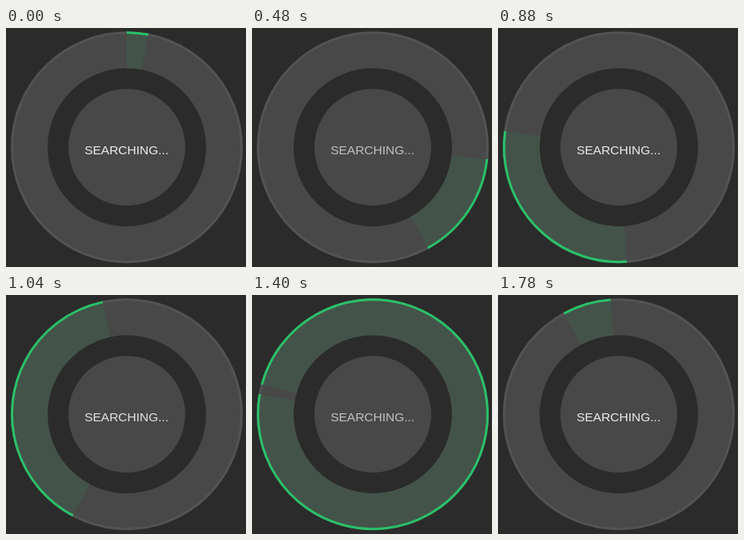
Write an HTML page that moves like this. It is 300 px wide and 299 px high and loops after 1.8 s.

```html
<!DOCTYPE html>
<html lang="en">
<head>
<meta charset="utf-8">
<title>Searching</title>
<style>
  html, body { margin: 0; width: 100%; height: 100%; overflow: hidden; background: #2b2b2b; }
  svg { display: block; width: 300px; height: 299px; }
  circle { fill: none; }
  text { font: 15.5px "Liberation Sans", Arial, sans-serif; fill: #fff; text-anchor: middle; }
</style>
</head>
<body>
<svg viewBox="0 0 300 299">
  <g transform="translate(151 149.2)">
    <circle r="121" stroke="#484848" stroke-width="44"/>
    <circle r="143.5" stroke="#535353" stroke-width="3"/>
    <circle r="73" style="fill:#484848"/>
    <g id="sweep">
      <circle r="120.5" pathLength="360" stroke="#435349" stroke-width="43"/>
      <circle r="143.5" pathLength="360" stroke="#29c168" stroke-width="3"/>
    </g>
  </g>
  <text id="label" x="150.7" y="158">SEARCHING...</text>
</svg>
<script>
const LOOP = 1800, STEP = 20;
const sweep = document.getElementById('sweep');
const label = document.getElementById('label');

// Time and dash travel in degrees: up to 360 the arc grows, after that its tail catches up.
const keys = [[0, 10.8], [320, 39.6], [640, 72.3], [880, 102],
              [1200, 200], [1400, 365], [1600, 571], [1800, 709]];

function slope(i) {
  const a = keys[Math.max(i - 1, 0)], b = keys[Math.min(i + 1, keys.length - 1)];
  return (b[1] - a[1]) / (b[0] - a[0]);
}

function travel(t) {
  let i = 0;
  while (t > keys[i + 1][0]) i++;
  const [t0, u0] = keys[i], [t1, u1] = keys[i + 1];
  const d = t1 - t0, s = (t - t0) / d, q = 1 - s;
  return u0 * q * q * (1 + 2 * s) + u1 * s * s * (3 - 2 * s)
       + d * s * q * (slope(i) * q - slope(i + 1) * s);
}

function draw(t) {
  const u = travel(t);
  const start = t / LOOP * 360 + Math.max(0, u - 360);
  const length = u < 360 ? u : 720 - u;
  sweep.setAttribute('transform', `rotate(${start - 90})`);
  sweep.setAttribute('stroke-dasharray', `${length} 360`);
  label.setAttribute('opacity', 0.78 + 0.12 * Math.cos(t / LOOP * 4 * Math.PI));
}

const begin = performance.now();
function tick() {
  const t = (performance.now() - begin) % LOOP;
  draw(Math.floor(t / STEP) * STEP);
  requestAnimationFrame(tick);
}
tick();
</script>
</body>
</html>
```
